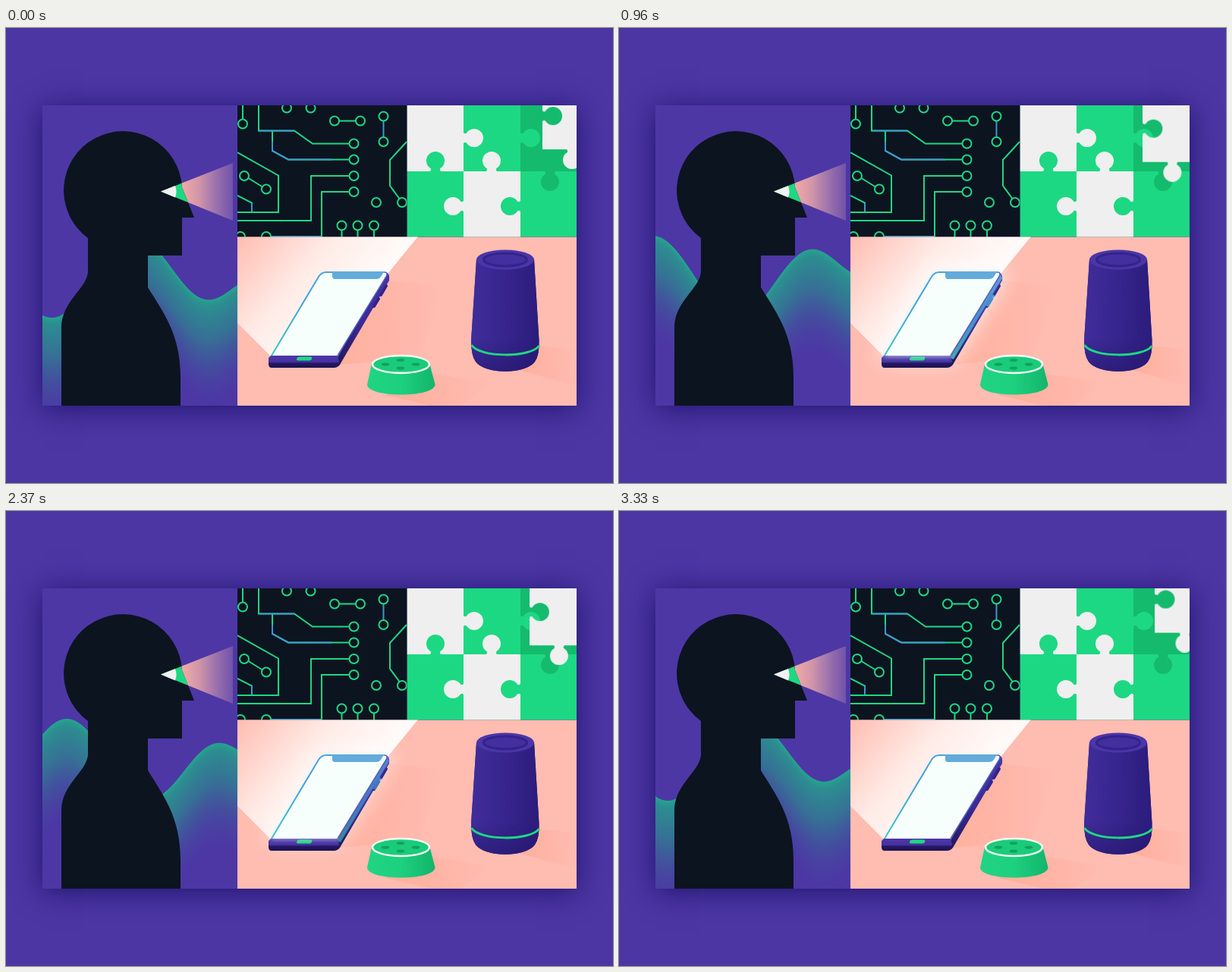
Recreate the animation shown at these times as an HTML page with a canvas. Size 800 by 600 pixels, loop 3360 ms.

```html
<!DOCTYPE html>
<html lang="en">
<head>
<meta charset="utf-8">
<title>Smart devices</title>
<style>
  html, body { margin: 0; width: 100%; height: 100%; overflow: hidden; background: #4c36a3; }
  .card, canvas, svg { position: absolute; }
  .card { left: 48px; top: 102px; width: 704px; height: 396px; background: #4d37a5; box-shadow: 0 4px 36px #211470; }
  canvas { left: 48px; top: 102px; }
  svg { left: 0; top: 0; }
  .piece { animation: slide 3360ms linear infinite; }
  .halo, .rim { animation: pulse 3360ms linear infinite; }
  .halo { filter: blur(15px); }
  .rim .soft { filter: blur(3px); }
  @keyframes slide {
    0%, 100% { transform: translate(25px, -25px); }
    42.86%, 57.14% { transform: none; }
  }
  @keyframes pulse {
    0%, 100% { opacity: 0; }
    18% { opacity: .65; }
    28% { opacity: 1; }
    43% { opacity: .12; }
    58% { opacity: .4; }
    70% { opacity: .75; }
    83% { opacity: .4; }
  }
</style>
</head>
<body>
<div class="card"></div>
<canvas id="wave" width="257" height="396"></canvas>
<svg width="800" height="600" viewBox="0 0 800 600">
  <defs>
    <path id="knob" d="M-1-7H0q3 3 5.5-1.5a12 12 0 1 1 0 17q-2.5-4.5-5.5-1.5h-1z"/>
    <path id="tile" d="M0 0V-37q3-3 5.5 1.5a12 12 0 1 0 0-17q-2.5 4.5-5.5 1.5V-88H75V0H46q-3 3 1.5 5.5a12 12 0 1 1-17 0q4.5-2.5 1.5-5.5z"/>
    <path id="bust" d="M108 277A78 78 0 1 1 232 210L248 250H232V300H187V342C205 372 230 402 230 460V498H73V395C73 361 106 344 108 322Z"/>
    <path id="screen" d="M350 432L412 328Q416 322 422 322H499Q504 322 501 328L437 432Z"/>
    <clipPath id="inBust"><use href="#bust"/></clipPath>
    <clipPath id="inCircuit"><path d="M305 102h223.500v173.500H305z"/></clipPath>
    <clipPath id="inPuzzle"><path d="M528.500 102H752v173.500H528.500z"/></clipPath>
    <clipPath id="inTable"><path d="M305 275.500h447V498H305z"/></clipPath>
    <linearGradient id="sight" gradientUnits="userSpaceOnUse" x1="230" x2="300" y1="0" y2="0">
      <stop stop-color="#f7aca6"/><stop offset=".35" stop-color="#e0a0aa" stop-opacity=".9"/>
      <stop offset="1" stop-color="#c090b8" stop-opacity=".3"/>
    </linearGradient>
    <linearGradient id="beam" gradientUnits="userSpaceOnUse" x1="445" y1="375" x2="318" y2="268">
      <stop stop-color="#fffaf8"/><stop offset=".45" stop-color="#ffebe6"/><stop offset="1" stop-color="#ffbfb4"/>
    </linearGradient>
    <linearGradient id="shade">
      <stop stop-color="#ffae9a"/><stop offset="1" stop-color="#ffae9a" stop-opacity="0"/>
    </linearGradient>
    <linearGradient id="front" x2="0" y2="1">
      <stop stop-color="#4e38ab"/><stop offset=".55" stop-color="#4731a0"/><stop offset=".65" stop-color="#251864"/><stop offset="1" stop-color="#1c1250"/>
    </linearGradient>
    <linearGradient id="side" x1="1" y1="0" x2="0" y2="1">
      <stop stop-color="#4a35a4"/><stop offset=".5" stop-color="#3b2995"/><stop offset="1" stop-color="#1c1250"/>
    </linearGradient>
    <linearGradient id="edge" x1="0" y1="1" x2="1" y2="0">
      <stop stop-color="#39c8c0"/><stop offset=".5" stop-color="#3d9fdc"/><stop offset="1" stop-color="#5aa9e0"/>
    </linearGradient>
    <linearGradient id="puck">
      <stop stop-color="#21d483"/><stop offset=".5" stop-color="#1dd07e"/><stop offset="1" stop-color="#13b56b"/>
    </linearGradient>
    <linearGradient id="speaker">
      <stop stop-color="#402d9a"/><stop offset=".45" stop-color="#38268f"/><stop offset="1" stop-color="#2b1c7c"/>
    </linearGradient>
    <linearGradient id="foot" x2="0" y2="1">
      <stop offset=".7" stop-color="#23166c" stop-opacity="0"/><stop offset="1" stop-color="#23166c" stop-opacity=".6"/>
    </linearGradient>
  </defs>

  <!-- viewer -->
  <path d="M204 215.500L299 178V254Z" fill="url(#sight)"/>
  <use href="#bust" fill="#0c1420"/>
  <g clip-path="url(#inBust)">
    <path d="M204 215.500L299 178V254Z" fill="#1dd882"/>
    <path d="M204 215.500L223 208Q226 216 223 223.500Z" fill="#f1f1f1"/>
  </g>

  <!-- circuit board -->
  <g clip-path="url(#inCircuit)">
    <path d="M305 102h224v174H305z" fill="#0c1420"/>
    <g fill="none" stroke="#1dd882" stroke-width="2">
      <path d="M312 102V120M333 102V135.500H380L404 152.500H452M351 135V162L372 173.500H452M452 195H402V254H305M452 216H416V275H349M305 164L359 194.500V243H305M305 221L324 230.500V243M528 150L506 174V208L518.500 225M439 122.500H461M319.500 198L338 209.500M442.500 266V276M463.500 266V276M485 266V276"/>
      <path d="M334 135.500H380M351 150V162L372 173.500H430M324 231V242M497.500 122V144M350 275H415" stroke="#3f97cf"/>
      <g id="nodes"></g>
    </g>
  </g>

  <!-- puzzle -->
  <g clip-path="url(#inPuzzle)">
    <path d="M528.500 102H752v174H528.500z" fill="#1dd882"/>
    <g fill="#efefef">
      <path d="M528.500 102H603v87H528.500zM603 189h75v87h-75z"/>
      <use href="#knob" transform="translate(603 145)"/>
      <use href="#knob" transform="translate(640 189) rotate(-90)"/>
      <use href="#knob" transform="translate(603 235) rotate(180)"/>
    </g>
    <g fill="#1dd882">
      <use href="#knob" transform="translate(566 189) rotate(-90)"/>
      <use href="#knob" transform="translate(678 235) rotate(180)"/>
    </g>
    <use href="#tile" transform="translate(678 189)" fill="#14bb6d"/>
    <g class="piece"><use href="#tile" transform="translate(682 185)" fill="#efefef"/></g>
  </g>

  <!-- table -->
  <g clip-path="url(#inTable)">
    <path d="M305 275.500h447V498H305z" fill="#ffbcb1"/>
    <g fill="url(#shade)">
      <path d="M504 333L576 341L545 434L440 444Z" opacity=".8"/>
      <path d="M555 455L640 468L600 498H560L500 484Z"/>
      <path d="M698 419L752 424V472L672 450Z"/>
    </g>
    <path d="M349 433L305 389V275H543L504 323Z" fill="url(#beam)"/>
    <use href="#screen" class="halo" fill="#fff" stroke="#fff" stroke-width="10"/>

    <!-- phone -->
    <path d="M437 434L501 323Q506 322 505 333L440 444Q437 448 432 448H424Z" fill="url(#side)"/>
    <path d="M501 340L494 352M491 357L485 367" stroke="#33238c" stroke-width="4" stroke-linecap="round"/>
    <path d="M346 435L350 431H437L439 440Q437 448 430 448H350Q346 448 346 443Z" fill="url(#front)"/>
    <rect x="382" y="433.500" width="20" height="5" rx="2.500" transform="translate(118 0) skewX(-15)" fill="#1dd882"/>
    <g class="rim">
      <use href="#screen" class="soft" fill="#fff" stroke="#c9e9f5" stroke-width="3" opacity=".75"/>
      <path d="M439 436L504 328M494 352L485 367" fill="none" stroke="url(#edge)" stroke-width="4" opacity=".85"/>
    </g>
    <use href="#screen" fill="#f7fffd"/>
    <path d="M350 432L412 328Q416 322 422 322H499" fill="none" stroke="url(#edge)" stroke-width="2"/>
    <path d="M437 432L501 328Q504 322 499 322" fill="none" stroke="#4a5fbd" stroke-width="1.500"/>
    <path d="M430 321.500H498L494 328Q492 331 488 331H433Q430 331 430 327Z" fill="#62abda"/>

    <!-- puck -->
    <path d="M482 443L476 470C476 488 565 488 565.500 470L558.500 443Z" fill="url(#puck)"/>
    <ellipse cx="520.500" cy="443.500" rx="37.500" ry="11.500" fill="#1acb7a" stroke="#effff5" stroke-width="2.500"/>
    <g fill="#10a261">
      <ellipse cx="520" cy="438" rx="5.500" ry="2"/><ellipse cx="500" cy="443.500" rx="5.500" ry="2"/>
      <ellipse cx="540" cy="443.500" rx="5.500" ry="2"/><ellipse cx="520" cy="448.500" rx="5.500" ry="2"/>
    </g>

    <!-- speaker -->
    <path id="can" d="M620 305L613 412Q613 432 619 440C631 457 685 457 697 440Q703 432 702.500 412L696 305Z" fill="url(#speaker)"/>
    <use href="#can" style="fill:url(#foot)"/>
    <path d="M620 305L613 412Q613 432 619 440C631 457 685 457 697 440Q703 432 702.500 412L696 305Z" fill="url(#foot)"/>
    <ellipse cx="658" cy="305.500" rx="38" ry="13" fill="#4b36a8"/>
    <ellipse cx="658" cy="305.500" rx="28.500" ry="8.500" fill="#432f9e" stroke="#33238b" stroke-width="3"/>
    <path d="M613.500 418C624 435 692 435 702.500 419" fill="none" stroke="#1dd882" stroke-width="3"/>
  </g>
</svg>
<script>
  const LOOP = 3360, LEFT = 48, TOP = 102, WAVELENGTH = 222;
  const canvas = document.getElementById('wave');
  const ctx = canvas.getContext('2d');

  const nodes = [
    [312, 126.5], [370, 105.5], [401.5, 105.5], [433, 122.5], [467, 122.5], [497.5, 116.5], [497.5, 150],
    [458.5, 152.5], [458.5, 173.5], [458.5, 195], [458.5, 216], [314, 195], [343, 212.5], [488, 230],
    [522, 230], [442.5, 260.5], [463.5, 260.5], [485, 260.5], [309, 275], [343, 275]
  ];
  document.getElementById('nodes').innerHTML =
    nodes.map(([x, y]) => `<circle cx="${x}" cy="${y}" r="6" fill="#0c1420"/>`).join('');

  const fade = ctx.createLinearGradient(0, 0, 0, 150);
  fade.addColorStop(0, '#24a48d');
  fade.addColorStop(.06, '#2c8e90');
  fade.addColorStop(.35, 'rgba(49,126,146,.8)');
  fade.addColorStop(1, 'rgba(77,55,165,0)');
  ctx.fillStyle = fade;

  // the swell calms down towards the right edge
  function waveY(x, crest) {
    const swell = 54 * (1 - Math.exp(-Math.pow((335 - x) / 70, 1.5)));
    return 328 - swell * Math.cos(2 * Math.PI * (x - crest) / WAVELENGTH);
  }

  function draw() {
    const t = performance.now() % LOOP;
    const crest = 393 - 2 * WAVELENGTH * t / LOOP;
    ctx.setTransform(1, 0, 0, 1, 0, 0);
    ctx.clearRect(0, 0, canvas.width, canvas.height);
    for (let i = 0; i < canvas.width; i++) {
      ctx.setTransform(1, 0, 0, 1, i, waveY(LEFT + i, crest) - TOP);
      ctx.fillRect(0, 0, 1, 150);
    }
    requestAnimationFrame(draw);
  }
  draw();
</script>
</body>
</html>
```
